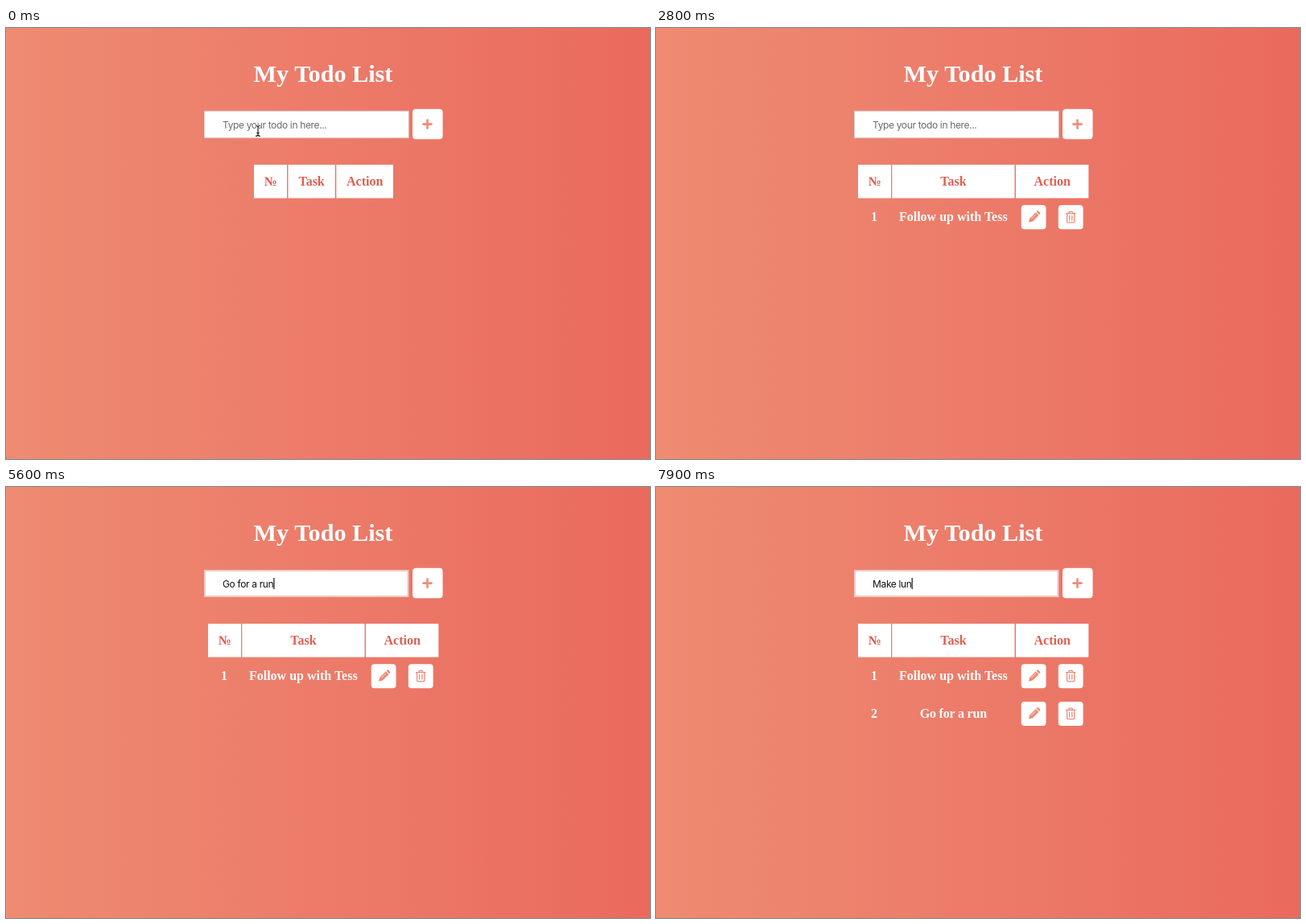
Animation, 800 px wide and 536 px high, one loop 8 s. Source, as an HTML page:

```html
<!DOCTYPE html>
<html lang="en">
<head>
<meta charset="utf-8">
<title>My Todo List</title>
<style>
  html, body { margin: 0; width: 100%; height: 100%; overflow: hidden; background: #ec7a68; }
  svg { display: block; width: 800px; height: 536px; }
  .serif { font: bold 16px "Liberation Serif", Times, serif; fill: #fff; text-anchor: middle; }
  .title { font-size: 30.2px; }
  .head { fill: #dc5f50; }
  .input { font: 12px Inter, Roboto, sans-serif; letter-spacing: -0.35px; white-space: pre; fill: #111; }
  .hint { fill: #6a6a6e; }
</style>
</head>
<body>
<svg viewBox="0 0 800 536" xmlns="http://www.w3.org/2000/svg">
  <defs>
    <linearGradient id="bg">
      <stop offset="0" stop-color="#ee8b71"/>
      <stop offset="0.5" stop-color="#ec7b69"/>
      <stop offset="1" stop-color="#ea6a5d"/>
    </linearGradient>
    <g id="actions">
      <rect x="453.7" y="0" width="30.8" height="30" rx="4" fill="#fff"/>
      <rect x="499.8" y="0" width="30.8" height="30" rx="4" fill="#fff"/>
      <g transform="translate(469.5 15) rotate(45)" fill="#ee8973">
        <path d="M-2.6 -8.2q0-1 1-1h3.2q1 0 1 1v1.4h-5.2zM-2.6 -5.8h5.2V5L0 9.2L-2.6 5z"/>
        <path d="M-.8 -4V4" stroke="#fff" stroke-width=".7"/>
      </g>
      <g transform="translate(515.2 15)" fill="none" stroke="#ee8973" stroke-width="1.3" stroke-linecap="round" stroke-linejoin="round">
        <path d="M-5.8 -4.6H5.8M-2.6 -4.8L-1.8 -6.8H1.8L2.6 -4.8M-4.6 -4.4V5.2q0 1.4 1.4 1.4H3.2q1.4 0 1.4-1.4V-4.4M-1.6 -1.8V3.8M1.6 -1.8V3.8"/>
      </g>
    </g>
  </defs>
  <rect width="800" height="536" fill="url(#bg)"/>
  <text class="serif title" x="394" y="67">My Todo List</text>

  <rect id="box" fill="#fff"/>
  <text id="entry" class="input" x="269" y="124.6"></text>
  <rect id="caret" y="113" width="1.2" height="14" fill="#111"/>

  <rect x="505" y="100.8" width="37.5" height="37.4" rx="4" fill="#fff"/>
  <path d="M518.4 119.6H528.6M523.5 114.5V124.7" stroke="#f18b77" stroke-width="2.6" stroke-linecap="round"/>

  <g id="table"></g>
  <g id="row0">
    <text class="serif" x="271" y="240">1</text>
    <text class="serif" x="369.3" y="240">Follow up with Tess</text>
    <use href="#actions" y="220.2"/>
  </g>
  <g id="row1">
    <text class="serif" x="271" y="287">2</text>
    <text class="serif" x="369.3" y="287" style="letter-spacing:-.2px">Go for a run</text>
    <use href="#actions" y="267"/>
  </g>

  <g id="beam" fill="none">
    <path d="M-3 -6.5Q-.4 -6.5 0 -5Q.4 -6.5 3 -6.5M0 -5V5M-3 6.5Q-.4 6.5 0 5Q.4 6.5 3 6.5M-1.6 2.6H1.6" stroke="#fff" stroke-width="2.4" opacity=".75"/>
    <path d="M-3 -6.5Q-.4 -6.5 0 -5Q.4 -6.5 3 -6.5M0 -5V5M-3 6.5Q-.4 6.5 0 5Q.4 6.5 3 6.5M-1.6 2.6H1.6" stroke="#111" stroke-width="1.1"/>
  </g>
</svg>
<script>
const LOOP = 8000, STEP = 100;
const $ = id => document.getElementById(id);
const set = (el, attrs) => { for (const k in attrs) el.setAttribute(k, attrs[k]); };
const show = (el, on) => { el.style.display = on ? "" : "none"; };

// One session per task: show pointer, click, type, submit.
// Runs are [time of first key, keys], one key per step.
const sessions = [
  { show: 0, click: 500, submit: 2800, path: [0, 313, 128, 500, 305, 128],
    runs: [[900, "Follow up with Tess"]] },
  { show: 3300, click: 3900, submit: 5800, path: [3300, 305, 128, 3900, 300, 130],
    runs: [[4200, "Go "], [4600, "for a r"], [5400, "u"], [5600, "n"]] },
  { show: 6200, click: 6600, submit: LOOP, path: [6200, 300, 130, 6500, 294, 131],
    runs: [[7100, "Make l"], [7800, "un"]] }
];

const narrow = [[308, 41], [350.5, 58.2], [410.3, 70.7]];
const wide = [[251, 41], [293.3, 152.2], [447, 90.3]];

function makeTable(cells) {
  const labels = ["№", "Task", "Action"];
  return cells.map(([x, w], i) =>
    `<rect x="${x}" y="170" width="${w}" height="41.6" fill="#fff"/>` +
    `<text class="serif head" x="${x + w / 2}" y="195.6">${labels[i]}</text>`).join("");
}
const tables = [makeTable(narrow), makeTable(wide)];
let shownTable = -1;

function typedAt(session, t) {
  return session.runs.map(([start, keys]) =>
    keys.slice(0, Math.max(0, Math.floor((t - start) / STEP) + 1))).join("");
}

function glide([t0, x0, y0, t1, x1, y1], t) {
  const p = Math.min(1, Math.max(0, (t - t0) / (t1 - t0)));
  const e = p * p * (3 - 2 * p);
  return [x0 + (x1 - x0) * e, y0 + (y1 - y0) * e];
}

function render(time) {
  const t = Math.floor((time % LOOP) / STEP) * STEP;
  const now = sessions.find(s => t < s.submit);
  const rows = sessions.indexOf(now);
  const focus = t >= now.click;
  const text = typedAt(now, t);

  set($("box"), focus
    ? { x: 247, y: 104, width: 252.4, height: 32, stroke: "#efc8c4", "stroke-width": 2 }
    : { x: 246.5, y: 103.3, width: 253.7, height: 33.4, stroke: "#dcc9c6", "stroke-width": 1 });

  const entry = $("entry");
  entry.textContent = text || "Type your todo in here...";
  entry.classList.toggle("hint", !text);
  show($("caret"), focus);
  set($("caret"), { x: 269 + (text ? entry.getComputedTextLength() : 0) });

  const kind = rows ? 1 : 0;
  if (kind !== shownTable) {
    $("table").innerHTML = tables[kind];
    shownTable = kind;
  }
  show($("row0"), rows > 0);
  show($("row1"), rows > 1);

  show($("beam"), t >= now.show && !text);
  set($("beam"), { transform: `translate(${glide(now.path, t)})` });
}

const begin = performance.now();
function tick() {
  render(performance.now() - begin);
  requestAnimationFrame(tick);
}
tick();
</script>
</body>
</html>
```
